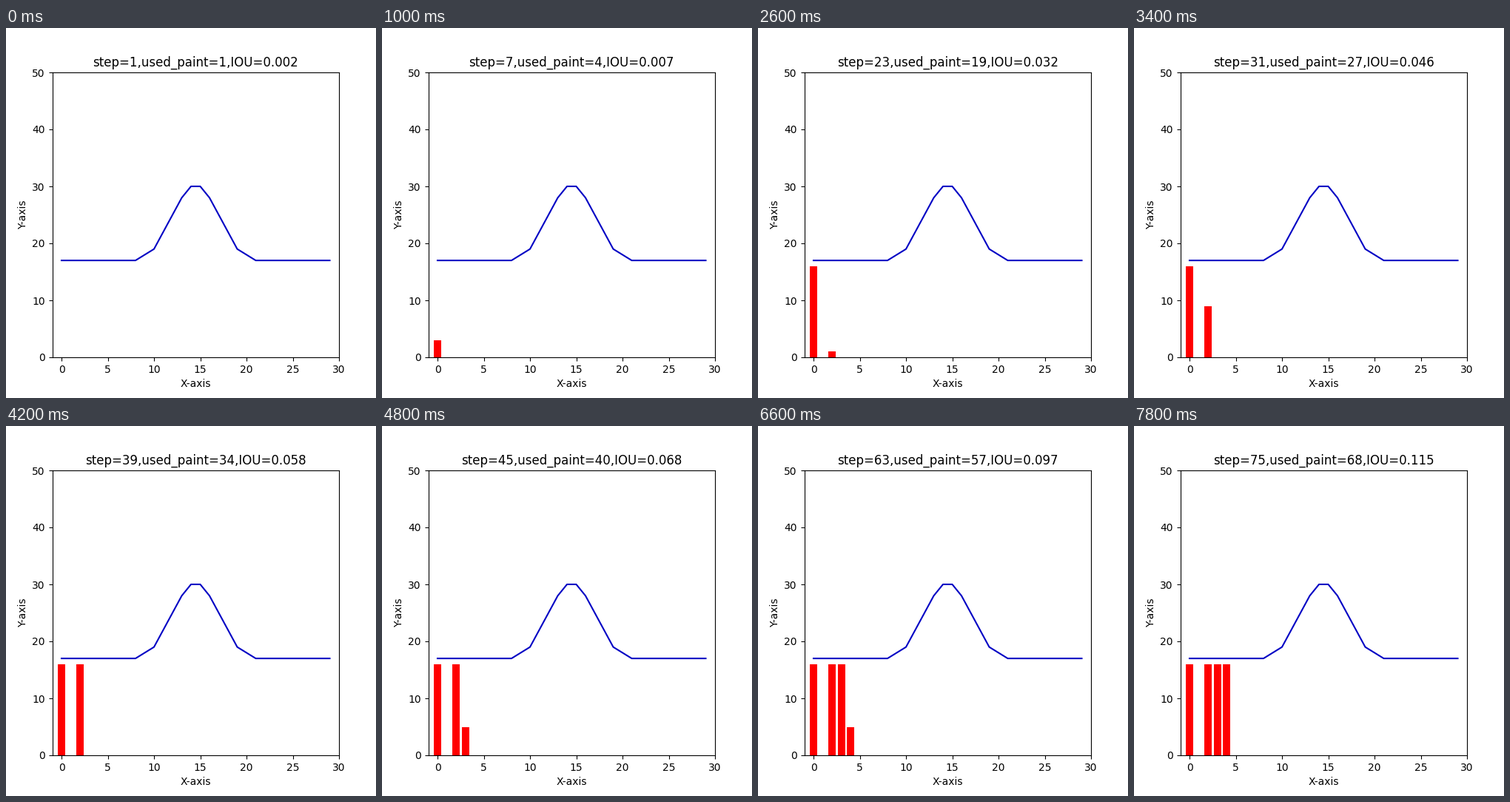
Write a matplotlib script that moves like this. It is 500x500 px and loops after 8 s.

```python
import numpy as np
import matplotlib.pyplot as plt
from matplotlib.animation import FuncAnimation

FRAMES = 40
INTERVAL = 200
COLUMNS = [0, 2, 3, 4]        # columns in the order they are painted
CELLS = 17                    # cells needed to fill one column
MOVES = (21, 39, 57, 75)      # steps spent moving to the next column

# Target profile: flat sides and a symmetric hill
half = [17] * 9 + [18, 19, 22, 25, 28, 30]
profile = np.array(half + half[::-1])
AREA = profile.sum()


def step_at(frame):
    """Slow start, then two steps per frame."""
    return round(1 + 1.2 * frame) if frame < 5 else 2 * frame - 3


def paint_at(step):
    if step <= 7:
        return (step + 1) // 2
    return step - 3 - sum(step >= m for m in MOVES)


def column_height(paint, k):
    """Index of the topmost painted cell in the k-th column."""
    return max(min(paint - CELLS * k, CELLS) - 1, 0)


fig, ax = plt.subplots(figsize=(5, 5), dpi=100)
fig.subplots_adjust(left=0.125, right=0.9, bottom=0.11, top=0.88)
ax.set_xlim(-1, 30)
ax.set_ylim(0, 50)
ax.set_xlabel("X-axis")
ax.set_ylabel("Y-axis")
title = ax.set_title("")
ax.plot(np.arange(len(profile)), profile, color="#0000c4", lw=1.5)
bars = ax.bar(COLUMNS, [0] * len(COLUMNS), width=0.8, color="red")


def update(frame):
    step = step_at(frame)
    paint = paint_at(step)
    for k, bar in enumerate(bars):
        height = column_height(paint, k)
        bar.set_height(height)
        bar.set_visible(height > 0)
    title.set_text(f"step={step},used_paint={paint},IOU={paint / AREA:.3f}")
    return [title, *bars]


anim = FuncAnimation(fig, update, frames=FRAMES, init_func=lambda: update(0),
                     interval=INTERVAL, repeat=True, repeat_delay=0, blit=False)
plt.show()
```
